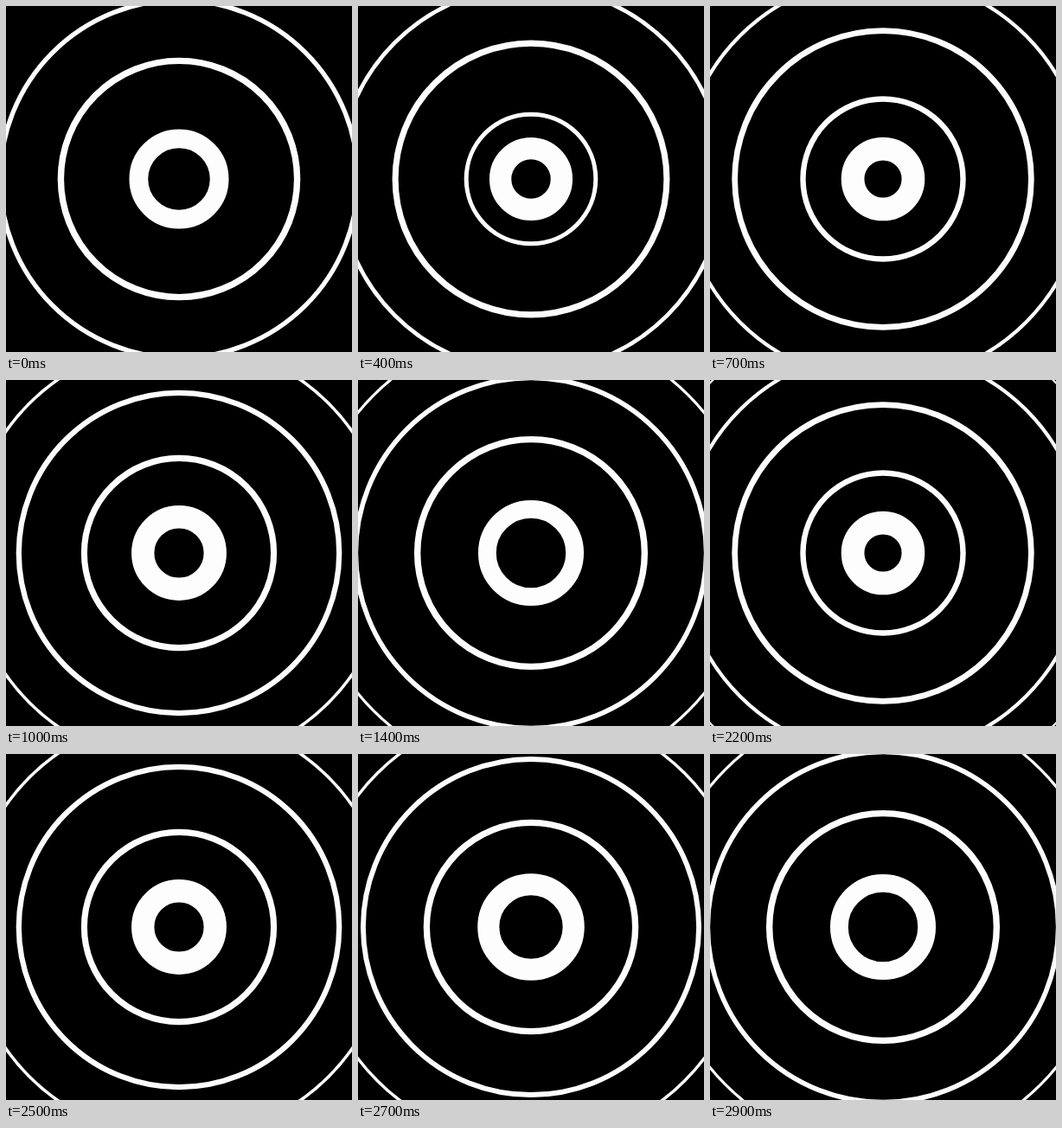
Write an HTML page with a canvas that moves like this. It is 400 by 400 pixels and loops after 3000 ms.

```html
<!DOCTYPE html>
<html lang="en">
<head>
<meta charset="utf-8">
<title>Pulse rings</title>
<style>
html, body { margin: 0; width: 100%; height: 100%; overflow: hidden; background: #000; }
canvas { display: block; }
</style>
</head>
<body>
<canvas id="stage" width="400" height="400"></canvas>
<script>
const ctx = document.getElementById('stage').getContext('2d');
const LOOP = 3000, BEAT = 1500, STEP = 100;

// Rings slow down steadily as they travel outward (age in seconds)
const ringRadius = age => 50.2 + 63 * age - 3.6 * age * age;

// The line swells quickly, then thins out
function ringWidth(age) {
  const x = (age + 0.15) / 1.55;
  return 7.4 * x * Math.exp(1 - x);
}

// Rises to a sharp peak, then sinks back softly
const pulse = (t, peak, depth, at) =>
  peak - depth * Math.abs(Math.sin(Math.PI * (t - at) / BEAT));

function circle(r, w) {
  ctx.lineWidth = w;
  ctx.beginPath();
  ctx.arc(200, 200, r, 0, Math.PI * 2);
  ctx.stroke();
}

function draw(t) {
  ctx.fillStyle = '#000';
  ctx.fillRect(0, 0, 400, 400);
  ctx.strokeStyle = '#fdfdfd';

  // Two rings are already under way when the loop begins
  for (let birth = -2 * BEAT; birth <= t; birth += BEAT) {
    const age = (t - birth) / 1000;
    circle(ringRadius(age), ringWidth(age));
  }

  const outer = pulse(t, 65.1, 17.8, 1290);
  const inner = pulse(t, 43, 22, 1340);
  circle((outer + inner) / 2, outer - inner);
}

const start = performance.now();

function tick(now) {
  const t = Math.max(0, now - start) % LOOP;
  draw(Math.floor(t / STEP) * STEP);
  requestAnimationFrame(tick);
}

tick(start);
</script>
</body>
</html>
```
